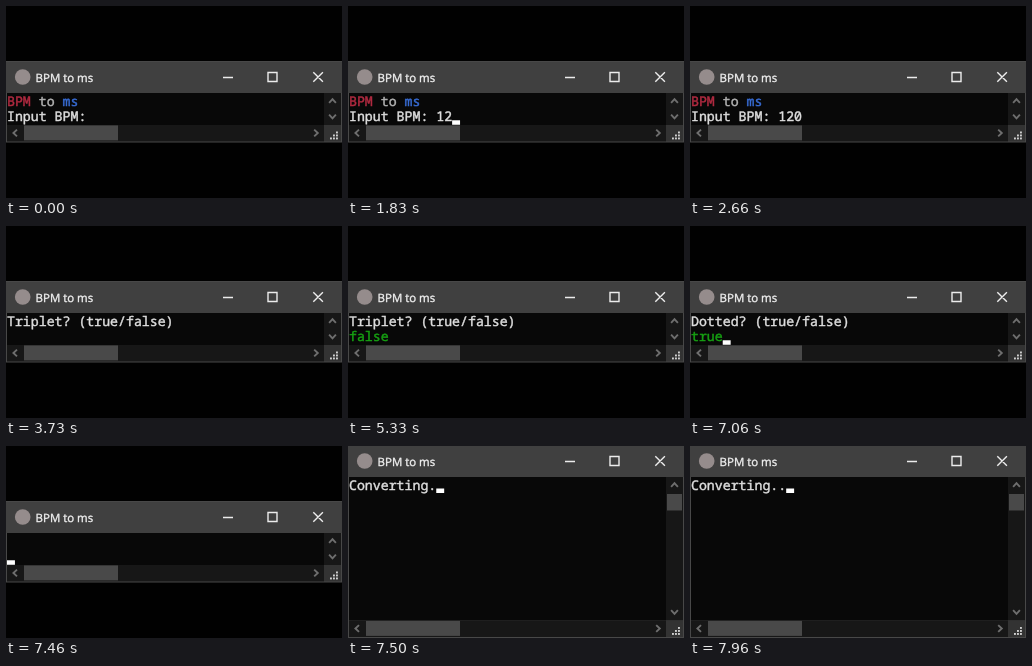
Animation of 336x192 px, one loop 8000 ms. Source, as an HTML page:

```html
<!DOCTYPE html>
<html lang="en">
<head>
<meta charset="utf-8">
<title>BPM to ms</title>
<style>
  html, body { margin: 0; width: 100%; height: 100%; overflow: hidden; background: #010101; }
  svg { display: block; width: 336px; height: 192px; }
  text { white-space: pre; text-rendering: geometricPrecision; }
  .title { font: 11.45px "Open Sans", "Noto Sans", sans-serif; fill: #f0f0f0; stroke: #f0f0f0; stroke-width: .35; }
  .mono { font: 13.22px "Noto Sans Mono", "DejaVu Sans Mono", monospace; stroke-width: .45; }
  .white { fill: #dedede; stroke: #dedede; }
  .red { fill: #b02a40; stroke: #b02a40; }
  .grey { fill: #b4b4b4; stroke: #b4b4b4; }
  .blue { fill: #376bd2; stroke: #376bd2; }
  .green { fill: #16a012; stroke: #16a012; }
  .line { fill: none; stroke: #ececec; stroke-width: 1.4; }
  .arrow { fill: none; stroke: #6e6e6e; stroke-width: 1.9; }
</style>
</head>
<body>
<svg id="stage" viewBox="0 0 336 192"></svg>
<script>
const LOOP = 8000, CELL = 7.932, ROW = 15.87;
const stage = document.getElementById('stage');

const span = (cls, text) => `<tspan class="${cls}">${text}</tspan>`;
const rect = (x, y, w, h, fill) => `<rect x="${x}" y="${y}" width="${w}" height="${h}" fill="${fill}"/>`;
const path = (cls, d) => `<path class="${cls}" d="${d}"/>`;
const row = (y, content) => `<text class="mono" x="1" y="${y}">${content}</text>`;

// Arrow heads: dir is +1 for right/down, -1 for left/up
const vArrow = (x, y, dir) => path('arrow', `M${x - 3.4} ${y - 1.8 * dir}l3.4 ${3.6 * dir} 3.4 ${-3.6 * dir}`);
const hArrow = (x, y, dir) => path('arrow', `M${x - 1.8 * dir} ${y - 3.4}l${3.6 * dir} 3.4 ${-3.6 * dir} 3.4`);

function grip(y) {
  let dots = '';
  for (let r = 0; r < 3; r++)
    for (let c = 2 - r; c < 3; c++) dots += rect(324 + c * 3, y + 6.5 + r * 3, 1.9, 1.9, '#d0d0d0');
  return dots;
}

// Window frame: top of the title bar and top of the horizontal scrollbar
function chrome(top, bar, vThumb) {
  const body = top + 31, mid = top + 15;
  return rect(0, top - 1, 336, bar + 18.5 - top, '#484848')
    + rect(0, top, 336, 31, '#404040')
    + rect(1, body, 317, bar - body, '#080808')
    + rect(318, body, 17, bar - body, '#171717')
    + rect(1, bar, 317, 16.5, '#171717')
    + rect(318, bar, 17, 16.5, '#333')
    + `<circle cx="16.7" cy="${mid}" r="7.8" fill="#958c8c"/>`
    + `<text class="title" x="29.6" y="${top + 19.8}">BPM to ms</text>`
    + path('line', `M217 ${mid + .5}h10M262 ${mid - 4.5}h9v9h-9zM307.3 ${mid - 4.8}l9.6 9.6m0-9.6l-9.6 9.6`)
    + vArrow(326.5, body + 8, -1) + vArrow(326.5, bar - 8.5, 1)
    + hArrow(9.2, bar + 8, -1) + hArrow(310, bar + 8, 1)
    + rect(18, bar + .4, 94, 15, '#494949')
    + (vThumb ? rect(319, 48, 15, 16.5, '#494949') : '')
    + grip(bar);
}

const bpm = {
  head: span('red', 'BPM') + span('grey', ' to ') + span('blue', 'ms'),
  prompt: 'Input BPM: ', ink: 'white'
};
const triplet = { head: span('white', 'Triplet? (true/false)'), prompt: '', ink: 'green' };
const dotted = { head: span('white', 'Dotted? (true/false)'), prompt: '', ink: 'green' };
const blank = { head: '', prompt: '', ink: 'white' };
const convert = { big: true, head: '', prompt: 'Converting', ink: 'white' };

// [start ms, page, typed text, cursor shown]
const steps = [
  [0, bpm, '', 0], [30, bpm, '', 1], [560, bpm, '', 0], [1090, bpm, '', 1],
  [1430, bpm, '1', 1], [1590, bpm, '1', 0], [1830, bpm, '12', 1],
  [2160, bpm, '12', 0], [2230, bpm, '120', 1], [2660, bpm, '120', 0],
  [2760, triplet, '', 1], [3730, triplet, '', 0], [4260, triplet, '', 1],
  [4330, triplet, 'f', 1], [4400, triplet, 'fa', 1], [4800, triplet, 'fa', 0],
  [4860, triplet, 'fal', 1], [5130, triplet, 'fals', 1], [5230, triplet, 'false', 1],
  [5330, triplet, 'false', 0],
  [5500, dotted, '', 1], [6400, dotted, 't', 1], [6630, dotted, 'tr', 1],
  [6830, dotted, 'tru', 1], [6900, dotted, 'tru', 0], [7060, dotted, 'true', 1],
  [7400, dotted, 'true', 0], [7430, blank, '', 0], [7460, blank, '', 1],
  [7500, convert, '.', 1], [7960, convert, '..', 1]
];

function draw([, page, typed, cursor]) {
  const base = page.big ? 43.6 : 99.5 + ROW;
  const col = page.prompt.length + typed.length;
  stage.innerHTML = (page.big ? chrome(0, 174.5, true) : chrome(56, 119, false))
    + row(99.5, page.head)
    + row(base, span('white', page.prompt) + span(page.ink, typed))
    + (cursor ? rect(1 + col * CELL, base - 1.1, CELL, 4.5, '#fff') : '');
}

const begin = performance.now();
let shown = null;
function tick() {
  const t = (performance.now() - begin) % LOOP;
  const step = steps.findLast(s => s[0] <= t);
  if (step !== shown) draw(shown = step);
  requestAnimationFrame(tick);
}
tick();
</script>
</body>
</html>
```
